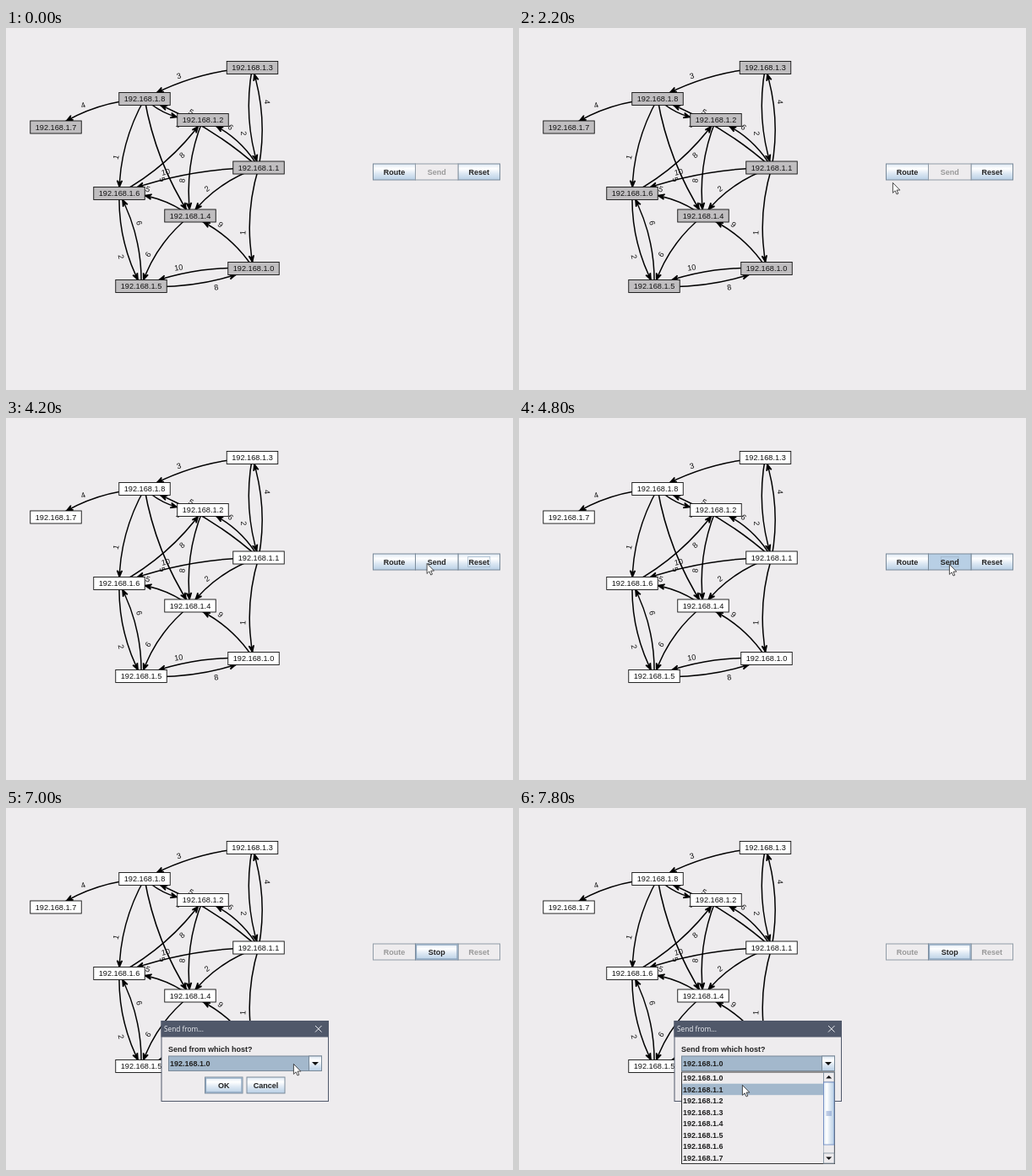
An HTML page for the animation above (8000 ms loop, 600 px wide and 429 px high).

```html
<!DOCTYPE html>
<html lang="en">
<head>
<meta charset="utf-8">
<title>Routing simulator</title>
<style>
  html, body { margin: 0; width: 100%; height: 100%; overflow: hidden; background: #eeecee; }
  svg { display: block; width: 100%; height: 100%; }
  text { font: 9.2px "Liberation Sans", Arial, sans-serif; fill: #111; }
  .bold { font-size: 9px; font-weight: bold; fill: #222; }
  .mid { text-anchor: middle; }
  .off { fill: #999; }
  .title { font: 8.3px "Open Sans", sans-serif; fill: #eceef2; }
  .edge { fill: none; stroke: #000; stroke-width: 1.5; }
  .head { stroke: #000; stroke-width: 1.5; }
  .node { stroke: #111; stroke-width: .9; }
</style>
</head>
<body>
<svg id="stage" viewBox="0 0 600 429"></svg>
<script>
const LOOP = 8000, STEP = 200;
const PANEL = '#eeecee', BORDER = '#7a8a99', SELECT = '#a3b8cc', PRESSED = '#b8cfe5';
const host = i => '192.168.1.' + i;

const nodes = [[293, 285], [299, 165.5], [233, 109], [291.5, 47], [218, 222.5],
               [160, 306], [134, 196], [59, 117.5], [164, 84]];
// from, to, weight
const edges = [[3, 8, 3], [8, 7, 4], [8, 6, 1], [8, 4, 5], [8, 2, 1], [3, 1, 2], [1, 3, 4],
               [1, 2, 6], [1, 8, 5], [1, 6, 10], [1, 4, 2], [1, 0, 1], [2, 4, 8], [6, 2, 8],
               [4, 6, 5], [4, 5, 6], [6, 5, 2], [5, 6, 6], [0, 4, 9], [0, 5, 10], [5, 0, 8]];
// time, x, y
const cursorKeys = [[1600, 559, 202], [2200, 442, 183], [2600, 464, 169], [3600, 464, 169],
                    [4400, 509, 173], [5000, 509, 173], [5600, 309, 273], [6000, 309, 273],
                    [6600, 340, 303], [7200, 340, 303], [7800, 264, 328]];

const rect = (x, y, w, h, fill, stroke = 'none', width = 1) =>
  `<rect x="${x}" y="${y}" width="${w}" height="${h}" fill="${fill}" stroke="${stroke}" stroke-width="${width}"/>`;
const text = (x, y, str, cls = '', extra = '') => `<text x="${x}" y="${y}" class="${cls}" ${extra}>${str}</text>`;
const path = (d, attrs) => `<path d="${d}" ${attrs}/>`;
const degrees = (dx, dy) => Math.atan2(dy, dx) * 180 / Math.PI;

function drawEdge([from, to, weight]) {
  const [ax, ay] = nodes[from], [bx, by] = nodes[to];
  const dx = bx - ax, dy = by - ay, length = Math.hypot(dx, dy);
  // point at a fraction of the chord, pushed 15px to the side
  const beside = f => [ax + dx * f - 15 * dy / length, ay + dy * f + 15 * dx / length];
  const [cx, cy] = beside(.5), [lx, ly] = beside(.65);
  const curve = (a, c, b, u) => (1 - u) ** 2 * a + 2 * u * (1 - u) * c + u * u * b;
  let u = 1, x = bx, y = by;
  while (Math.abs(x - bx) < 30.5 && Math.abs(y - by) < 7.5) {
    u -= .002;
    x = curve(ax, cx, bx, u);
    y = curve(ay, cy, by, u);
  }
  const heading = degrees((1 - u) * (cx - ax) + u * (bx - cx), (1 - u) * (cy - ay) + u * (by - cy));
  const tilt = degrees(dx, dy) + (dx < 0 ? 180 : 0);
  return path(`M${ax} ${ay}Q${cx} ${cy} ${bx} ${by}`, 'class="edge"') +
    path('M0 0L-7.5 3 -4.5 0 -7.5 -3Z', `class="head" transform="translate(${x} ${y}) rotate(${heading})"`) +
    text(0, 3.2, weight, 'mid', `transform="translate(${lx} ${ly}) rotate(${tilt})"`);
}

const drawNode = fill => ([x, y], i) =>
  rect(x - 30.25, y - 7.5, 60.5, 15, fill, '#111', .9) + text(x, y + 3.3, host(i), 'mid');

function button(x, y, w, label, { off, pressed, focus, strong } = {}) {
  const fill = off ? PANEL : pressed ? PRESSED : 'url(#metal)';
  const half = label.length * 2.6;
  return rect(x, y, w, 19, fill, off ? '#929da8' : BORDER) +
    (strong ? rect(x + 1, y + 1, w - 2, 17, 'none', '#8da5be', 1.3) : '') +
    (focus ? rect(x + w / 2 - half, y + 3.5, half * 2, 12, 'none', SELECT, .8) : '') +
    text(x + w / 2, y + 12.9, label, 'bold mid' + (off ? ' off' : ''));
}

function toolbar(t) {
  const sending = t >= 5000, routed = t >= 2800;
  return button(434.5, 161, 50, 'Route', { off: sending, pressed: t >= 2600 && !routed }) +
    button(535, 161, 49.5, 'Reset', { off: sending, focus: routed && t < 4600 }) +
    (sending ? button(484.5, 161, 50.5, 'Stop', { strong: true })
             : button(484.5, 161, 50.5, 'Send', { off: !routed, pressed: t >= 4600, focus: t >= 4600 }));
}

const triangle = (x, y, r, down) => path(`M${x - r} ${y}h${2 * r}l${-r} ${down ? r : -r}Z`, 'fill="#111"');

const dialog = () =>
  rect(184, 252.5, 197.5, 95, PANEL, '#50586a') +
  rect(183.5, 252, 198.5, 19.5, '#50586a') +
  text(187, 264.7, 'Send from...', 'title') +
  path('M366 258l7.5 7.5m0 -7.5l-7.5 7.5', 'stroke="#eceef2"') +
  text(192, 288.8, 'Send from which host?', 'bold') +
  rect(192.5, 294, 181, 17.5, SELECT, BORDER) +
  rect(358.5, 294, 15, 17.5, 'url(#metal)', BORDER) +
  triangle(366, 301, 4, true) +
  text(194, 306, host(0), 'bold') +
  button(235.5, 319, 44.5, 'OK', { strong: true }) +
  button(285, 319, 45, 'Cancel');

function dropdown(hover) {
  let rows = '';
  for (let i = 0; i < 8; i++) {
    const top = 313.2 + i * 13.5;
    if (i === hover) rows += rect(193, top, 167, 13.5, SELECT);
    rows += text(194, top + 10, host(i), 'bold');
  }
  return rect(192.5, 313, 181, 108.5, PANEL, '#333') + rows +
    rect(360.5, 313.5, 12.5, 107.5, PANEL, '#a5b0bb', .8) +
    rect(360.5, 313.5, 12.5, 11.5, PANEL, BORDER, .8) + triangle(366.7, 320.5, 3.5, false) +
    rect(360.5, 325, 12.5, 74, 'url(#thumb)', '#6382bf', .8) +
    path('M363.5 360h6.5m-6.5 2h6.5m-6.5 2h6.5', 'stroke="#6382bf" stroke-width=".8"') +
    rect(360.5, 409, 12.5, 12, PANEL, BORDER, .8) + triangle(366.7, 413.5, 3.5, true);
}

function cursorAt(t) {
  const next = cursorKeys.findIndex(key => key[0] > t);
  if (next < 0) return cursorKeys.at(-1).slice(1);
  const [t0, x0, y0] = cursorKeys[next - 1], [t1, x1, y1] = cursorKeys[next];
  const f = (t - t0) / (t1 - t0);
  return [x0 + (x1 - x0) * f, y0 + (y1 - y0) * f];
}

const cursor = ([x, y]) => path('M.4 .4V12.4L3.1 9.8 5 14 6.8 13.2 5 9.1H8.8Z',
  `fill="#fff" stroke="#222" stroke-width=".8" transform="translate(${x} ${y})"`);

const stops = `<stop offset="0" stop-color="#dde8f3"/><stop offset=".3" stop-color="#fff"/>
  <stop offset=".6" stop-color="#dde8f3"/><stop offset="1" stop-color="#b8cfe5"/>`;
const defs = `<defs><linearGradient id="metal" x2="0" y2="1">${stops}</linearGradient>
  <linearGradient id="thumb">${stops}</linearGradient></defs>`;
const links = edges.map(drawEdge).join('');

function scene(t) {
  const pointer = t >= cursorKeys[0][0] ? cursorAt(t) : null;
  let out = defs + links + nodes.map(drawNode(t < 2800 ? '#c0bec0' : '#fff')).join('') + toolbar(t);
  if (t >= 5000) out += dialog();
  if (t >= 7200) out += dropdown(Math.max(0, Math.floor((pointer[1] - 313.2) / 13.5)));
  return pointer ? out + cursor(pointer) : out;
}

const stage = document.getElementById('stage');
let shown = -1, start;
function tick(now) {
  start ??= now;
  const t = Math.floor((now - start) % LOOP / STEP) * STEP;
  if (t !== shown) stage.innerHTML = scene(shown = t);
  requestAnimationFrame(tick);
}
requestAnimationFrame(tick);
</script>
</body>
</html>
```
